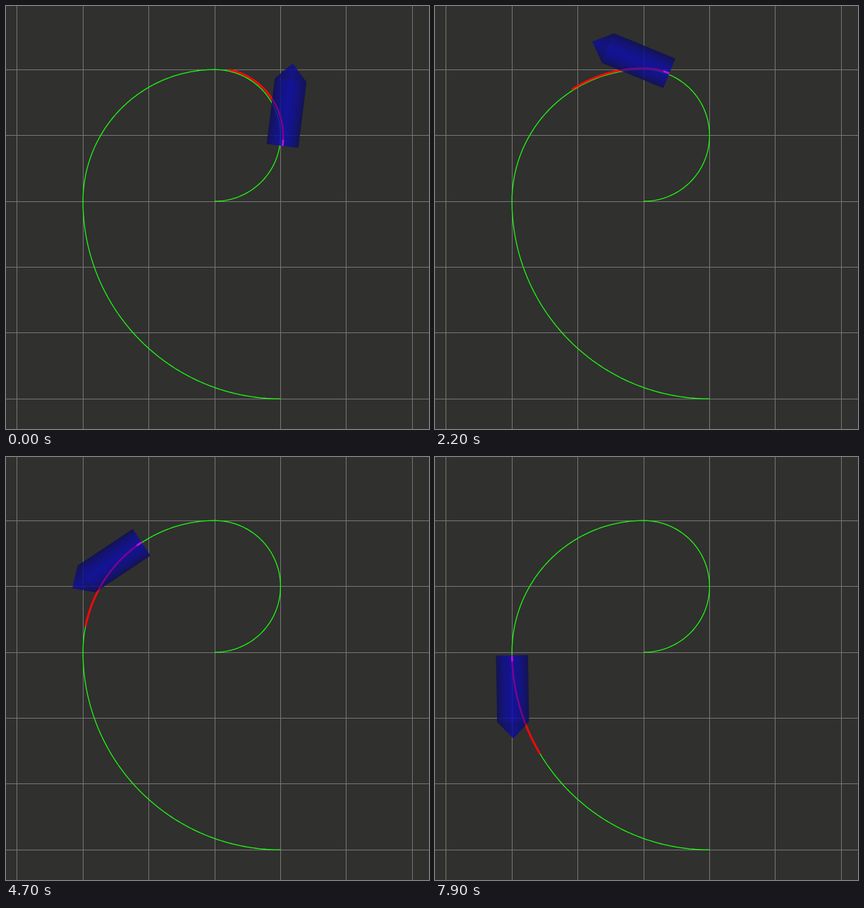
Write an HTML page with a canvas that moves like this. It is 600x600 px and loops after 8000 ms.

```html
<!DOCTYPE html>
<html lang="en">
<head>
<meta charset="utf-8">
<title>Path tracking</title>
<style>
html, body { margin: 0; width: 100%; height: 100%; overflow: hidden; background: #30302e; }
canvas { display: block; width: 600px; height: 600px; }
</style>
</head>
<body>
<canvas id="stage" width="600" height="600"></canvas>
<script>
const ctx = document.getElementById('stage').getContext('2d');
const LOOP = 8000, STEP = 100;
const CELL = 93.4, OX = 296, OY = 277;
const BODY = 94, TIP = 118, HALF = 22.7;

// Arcs of the route: centre and radius in cells, start and end heading.
const ARCS = [
  { x: 0, y: -1, r: 1, from: 0, to: Math.PI },
  { x: 0, y: 0, r: 2, from: Math.PI, to: Math.PI * 1.5 },
  { x: 1, y: 0, r: 3, from: Math.PI * 1.5, to: Math.PI * 2 }
];

// time, distance along route, end of plan, start offset, end offset, tilt in degrees
const KEYS = [
  [0, 1.417, 2.93, 4, 2, 1.8],
  [1200, 2.129, 3.655, 2.7, 2, 0.1],
  [3200, 3.372, 4.915, 1.2, 1.2, 0],
  [4700, 4.314, 5.886, 0.5, 0, 0],
  [5700, 4.971, 6.497, 0, 0.8, 0.6],
  [7000, 5.763, 7.295, 0, 0, 0],
  [7900, 6.331, 7.904, 0, 0, 0]
];

const mix = (a, b, k) => a + (b - a) * k;

function stateAt(t) {
  let i = 0;
  while (i < KEYS.length - 2 && t > KEYS[i + 1][0]) i++;
  const a = KEYS[i], b = KEYS[i + 1];
  const k = Math.min(1, (t - a[0]) / (b[0] - a[0]));
  return a.map((v, n) => mix(v, b[n], k));
}

// Point and heading at distance s, shifted outwards by off pixels.
function route(s, off = 0) {
  let n = 0;
  for (; n < 2; n++) {
    const len = ARCS[n].r * (ARCS[n].to - ARCS[n].from);
    if (s <= len) break;
    s -= len;
  }
  const c = ARCS[n], angle = c.from + s / c.r, r = c.r * CELL + off;
  return {
    x: OX + c.x * CELL + r * Math.sin(angle),
    y: OY + c.y * CELL + r * Math.cos(angle),
    angle
  };
}

function trace(s0, s1, off0 = 0, off1 = 0) {
  const steps = Math.ceil((s1 - s0) * 40);
  ctx.beginPath();
  for (let i = 0; i <= steps; i++) {
    const k = i / steps, p = route(mix(s0, s1, k), mix(off0, off1, k));
    ctx.lineTo(p.x, p.y);
  }
}

function stroke(color, width) {
  ctx.strokeStyle = color;
  ctx.lineWidth = width;
  ctx.stroke();
}

function grid() {
  ctx.fillStyle = '#767674';
  for (let i = -3; i <= 3; i++) {
    ctx.fillRect(Math.round(OX + i * CELL - 0.5), 0, 1, 600);
    ctx.fillRect(0, Math.round(OY + i * CELL - 0.5), 600, 1);
  }
}

function polygon(points) {
  const shape = new Path2D();
  points.forEach(([x, y]) => shape.lineTo(x, y));
  shape.closePath();
  return shape;
}

const hull = polygon([[0, -HALF], [BODY, -HALF], [TIP, 0], [BODY, HALF], [0, HALF]]);
const barrel = polygon([[0, -HALF], [BODY, -HALF], [BODY, HALF], [0, HALF]]);
const nose = polygon([[BODY, -HALF], [TIP, 0], [BODY, HALF]]);

function shade(edge, side, core) {
  const g = ctx.createLinearGradient(0, -HALF, 0, HALF);
  [[0, edge], [0.22, side], [0.5, core], [0.78, side], [1, edge]]
    .forEach(([at, blue]) => g.addColorStop(at, `rgba(14,14,${blue},0.84)`));
  return g;
}
const barrelFill = shade(88, 140, 172);
const noseFill = shade(84, 118, 150);

function draw(t) {
  const [, s, end, off0, off1, tilt] = stateAt(t);
  const tail = route(s, off0);

  ctx.setTransform(1, 0, 0, 1, 0, 0);
  ctx.fillStyle = '#30302e';
  ctx.fillRect(0, 0, 600, 600);
  grid();
  trace(0, Math.PI * 3.5);
  stroke('#1cf812', 1.3);
  trace(s, end, off0, off1);
  stroke('#ff0808', 2.8);

  ctx.save();
  ctx.translate(tail.x, tail.y);
  ctx.rotate(-tail.angle - tilt * Math.PI / 180);
  ctx.fillStyle = barrelFill;
  ctx.fill(barrel);
  ctx.fillStyle = noseFill;
  ctx.fill(nose);

  // The plan shows through the hull in purple, brightest at the tail.
  ctx.clip(hull);
  ctx.setTransform(1, 0, 0, 1, 0, 0);
  trace(s, end, off0, off1);
  stroke('rgba(150,0,140,0.75)', 2.2);
  trace(s, s + 0.09, off0, off0);
  stroke('#c010e0', 2.6);
  ctx.restore();
}

const start = performance.now();
function frame() {
  const t = (performance.now() - start) % LOOP;
  draw(Math.floor(t / STEP) * STEP);
  requestAnimationFrame(frame);
}
frame();
</script>
</body>
</html>
```
